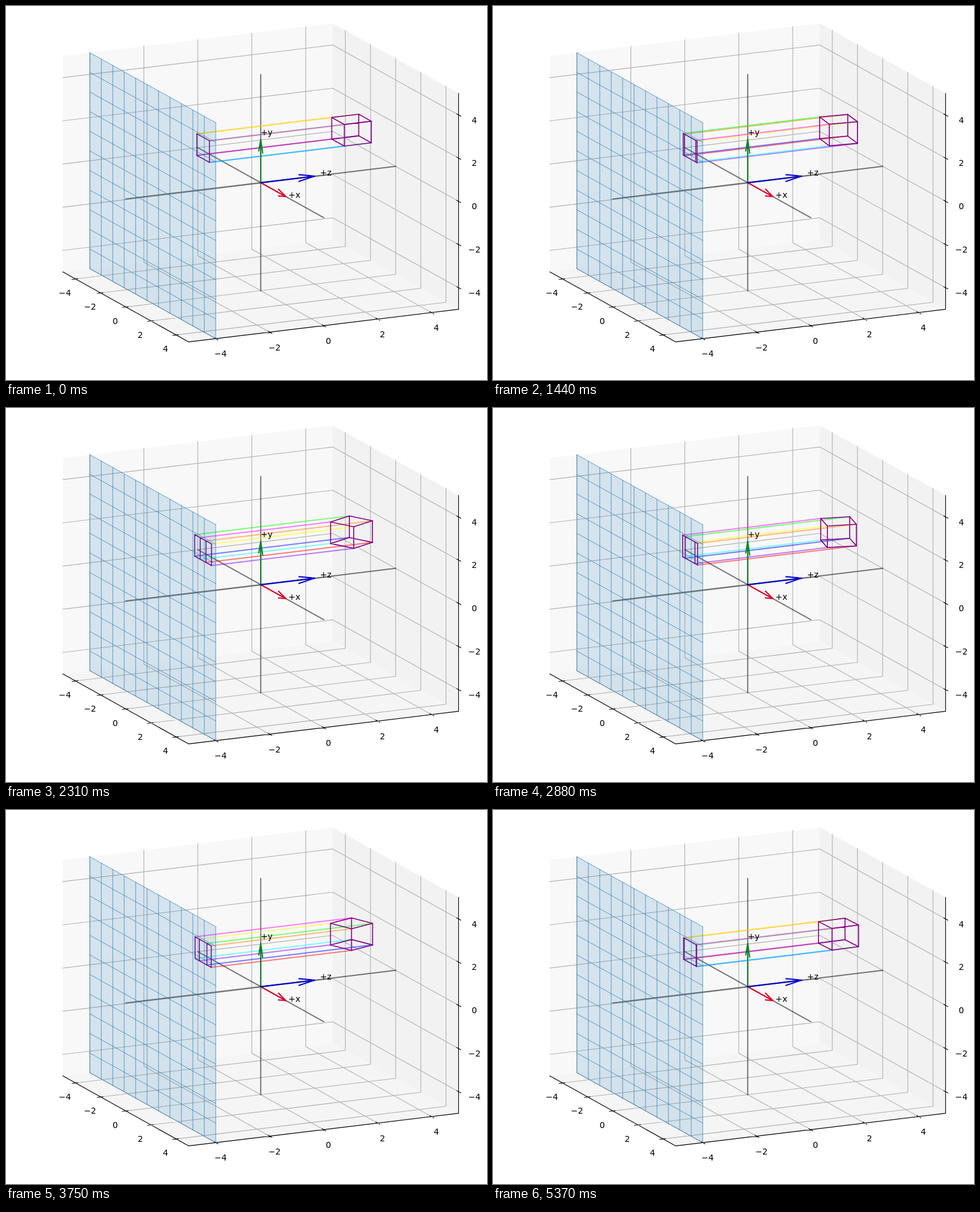
Write an HTML page that moves like this. It is 801 px wide and 622 px high and loops after 5400 ms.

```html
<!DOCTYPE html>
<html lang="en">
<head>
<meta charset="utf-8">
<title>Rotating cube projected onto a plane</title>
<style>
  html, body { margin: 0; width: 100%; height: 100%; overflow: hidden; background: #fff; }
  svg { display: block; width: 801px; height: 622px; }
  path { fill: none; stroke-linecap: square; stroke-linejoin: round; }
  text { font: 13.89px "DejaVu Sans", sans-serif; }
  .tick { text-anchor: middle; }
</style>
</head>
<body>
<svg viewBox="0 0 801 622"><g id="back"></g><g id="moving"></g><g id="front"></g></svg>
<script>
const RAD = Math.PI / 180;
const UNIT = 49.58, ELEV = 15 * RAD, AZIM = 25 * RAD;
const ORIGIN = [424.2, 293.8];
const X = [UNIT * Math.sin(AZIM), UNIT * Math.cos(AZIM) * Math.sin(ELEV)];
const Y = [0, -UNIT * 0.75 * Math.cos(ELEV)];
const Z = [UNIT * Math.cos(AZIM), -UNIT * Math.sin(AZIM) * Math.sin(ELEV)];
const STEP = 30, FRAMES = 180;
const WALL = -4, CENTER = [4, 3.5, 1.5];

// Parallel projection of a point in space to the stage
const project = ([x, y, z]) =>
  [0, 1].map(i => ORIGIN[i] + x * X[i] + y * Y[i] + z * Z[i]);
const line = (...points) =>
  "M" + points.map(p => project(p).map(v => v.toFixed(2)).join(" ")).join("L");
const stroke = (d, color, width, opacity = 1) =>
  `<path d="${d}" stroke="${color}" stroke-width="${width}" stroke-opacity="${opacity}"/>`;
const fill = (d, color, opacity = 1) =>
  `<path d="${d}Z" style="fill:${color};fill-opacity:${opacity}"/>`;
const label = (text, [x, y], cls = "") =>
  `<text class="${cls}" x="${x.toFixed(2)}" y="${y.toFixed(2)}">${text}</text>`;

function drawBack() {
  let out =
    fill(line([-5, -5, -5], [-5, 5, -5], [-5, 5, 5], [-5, -5, 5]), "#f8f8f8") +
    fill(line([-5, -5, 5], [-5, 5, 5], [5, 5, 5], [5, -5, 5]), "#f2f2f2") +
    fill(line([-5, -5, -5], [5, -5, -5], [5, -5, 5], [-5, -5, 5]), "#f5f5f5");
  let grid = "", ticks = "", texts = "";
  for (let v = -4; v <= 4; v += 2) {
    grid += line([v, -5, -5], [v, -5, 5], [v, 5, 5]) +
      line([5, -5, v], [-5, -5, v], [-5, 5, v]) +
      line([-5, v, -5], [-5, v, 5], [5, v, 5]);
    ticks += line([v, -5, -5.13], [v, -5, -4.91]) +
      line([4.86, -5, v], [5.18, -5, v]) +
      line([4.86, v, 5], [5.18, v, 5]);
    const name = String(v).replace("-", "\u2212");
    const place = (x, y, axis) =>
      label(name, [x + v * axis[0], y + v * axis[1] + 5], "tick");
    texts += place(181.8, 523.5, X) + place(537, 556.8, Z) + place(780, 333.3, Y);
  }
  out += stroke(grid, "#b0b0b0", 1.11);
  out += stroke(line([-5, -5, -5], [5, -5, -5], [5, -5, 5], [5, 5, 5]) + ticks, "#000", 1.11);
  out += texts;
  const axes = [
    line([-5, 0, 0], [5, 0, 0]),
    line([0, -5, 0], [0, 5, 0]),
    line([0, 0, -5], [0, 0, 5])
  ];
  return out + axes.map(d => stroke(d, "#000", 2, 0.52)).join("");
}

function drawFront() {
  const size = 10 / 11;
  let mesh = "";
  for (let i = 0; i <= 11; i++) {
    const v = -5 + i * size;
    mesh += line([v, -5, WALL], [v, 5, WALL]) + line([-5, v, WALL], [5, v, WALL]);
  }
  const wall = line([-5, -5, WALL], [5, -5, WALL], [5, 5, WALL], [-5, 5, WALL]);
  const along = 2 - 0.6 * Math.cos(ELEV), side = 0.6 * Math.sin(ELEV);
  const arrow = (tip, a, b, color) =>
    stroke(line([0, 0, 0], tip) + line(a, tip, b), color, 2);
  return fill(wall, "#1f77b4", 0.16) + stroke(mesh, "#1f77b4", 0.8, 0.85) +
    arrow([2, 0, 0], [along, side, 0], [along, -side, 0], "#dc0028") +
    arrow([0, 2, 0], [side, along, 0], [-side, along, 0], "#087f28") +
    arrow([0, 0, 2], [0, side, along], [0, -side, along], "#0000c8") +
    label("+x", project([2.2, 0, 0])) +
    label("+y", project([0, 2.2, 0])) +
    label("+z", project([0, 0, 2.2]));
}

// Cube corners: x, y, z offsets and the colour of the ray to the wall
const CORNERS = [
  [-1, 1, -1, "#ff7f00"], [-1, 1, 1, "#ffff00"],
  [1, 1, -1, "#00ff00"], [1, 1, 1, "#ff00ff"],
  [-1, -1, -1, "#ff0000"], [-1, -1, 1, "#7f00ff"],
  [1, -1, -1, "#0000ff"], [1, -1, 1, "#00ffff"]
];
const EDGES = [];
CORNERS.forEach((a, i) => CORNERS.forEach((b, j) => {
  const differing = [0, 1, 2].filter(k => a[k] !== b[k]).length;
  if (i < j && differing === 1) EDGES.push([i, j]);
}));

function drawCube(angle) {
  const c = Math.cos(angle) / 2, s = Math.sin(angle) / 2;
  const solid = CORNERS.map(([x, y, z]) =>
    [CENTER[0] + x * c - z * s, CENTER[1] + y / 2, CENTER[2] + x * s + z * c]);
  const flat = solid.map(([x, y]) => [x, y, WALL]);
  const rays = solid.map((p, i) => stroke(line(p, flat[i]), CORNERS[i][3], 2, 0.5)).join("");
  const edges = [solid, flat].map(pts =>
    EDGES.map(([i, j]) => line(pts[i], pts[j])).join("")).join("");
  return rays + stroke(edges, "#800080", 1.6);
}

const layer = id => document.getElementById(id);
layer("back").innerHTML = drawBack();
layer("front").innerHTML = drawFront();

const start = performance.now();
let shown = -1;
function tick() {
  const frame = Math.floor((performance.now() - start) / STEP) % FRAMES;
  if (frame !== shown) {
    shown = frame;
    layer("moving").innerHTML = drawCube(-360 * RAD * frame / FRAMES);
  }
  requestAnimationFrame(tick);
}
tick();
</script>
</body>
</html>
```
